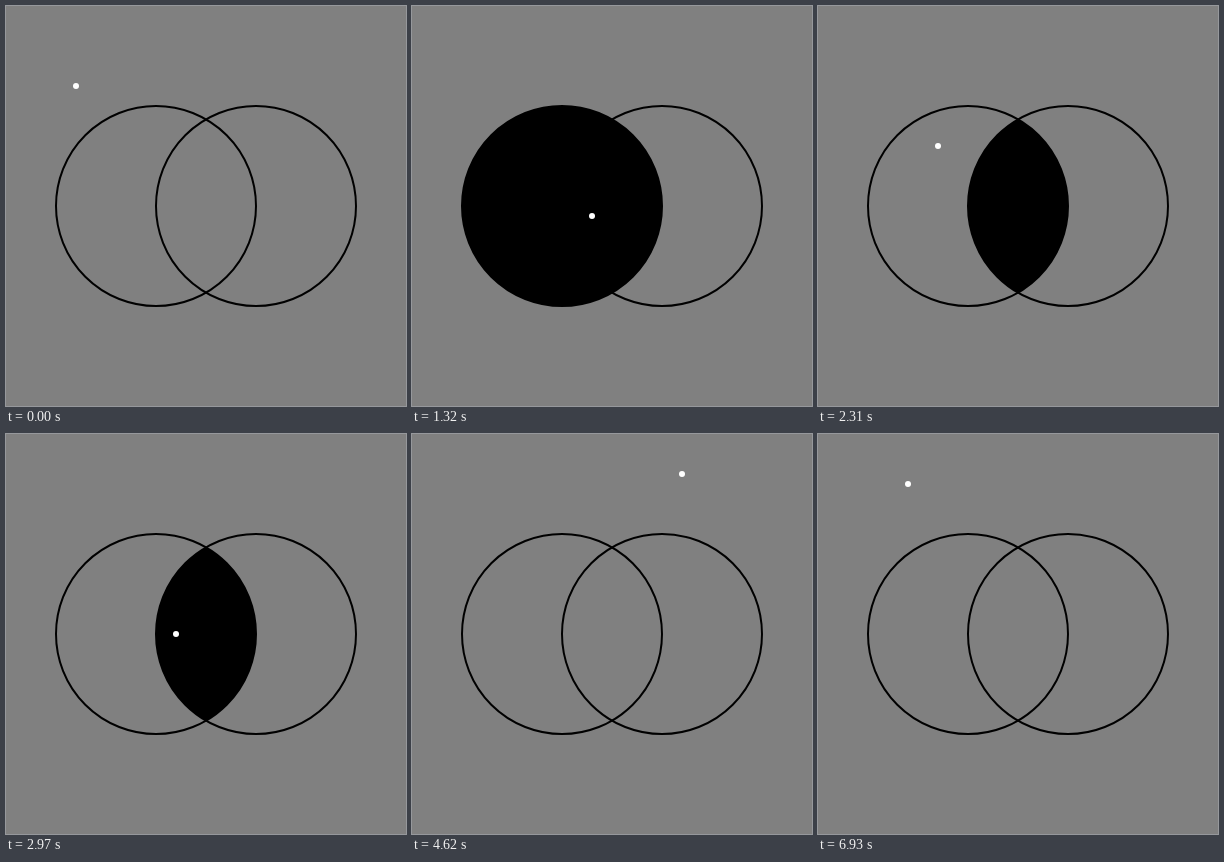
Recreate the animation shown at these times as an HTML page. Size 400 by 400 pixels, loop 7.59 s.

```html
<!DOCTYPE html>
<html lang="en">
<head>
<meta charset="utf-8">
<title>Two circles</title>
<style>
  html, body { margin: 0; width: 100%; height: 100%; overflow: hidden; background: #808080; }
  svg { display: block; width: 100%; height: 100%; }
</style>
</head>
<body>
<svg viewBox="0 0 400 400">
  <path id="crescent" d="M200 113.4A100 100 0 1 0 200 286.6A100 100 0 0 1 200 113.4Z"/>
  <path id="lens" d="M200 113.4A100 100 0 0 1 200 286.6A100 100 0 0 1 200 113.4Z"/>
  <g fill="none" stroke="#000" stroke-width="2">
    <circle cx="150" cy="200" r="100"/>
    <circle cx="250" cy="200" r="100"/>
  </g>
  <circle id="dot" r="3" fill="#fff"/>
</svg>
<script>
  const BEAT = 330, BEATS = 23, LIT_BEATS = 6;
  const [crescent, lens, dot] = ["crescent", "lens", "dot"].map(id => document.getElementById(id));

  const approach = [[70, 80], [100, 150]];
  // Swing line from inside the lens to inside the crescent
  const swing = [[180, 210], [170, 200], [110, 150], [120, 140]];
  const leave = [[220, 110], [260, 30], [270, 40], [230, 60], [80, 30]];

  function dotAt(beat) {
    if (beat < 3) return approach[Math.min(beat, 1)];
    if (beat < 12) return swing[Math.abs(3 - Math.abs(beat - 7))];
    if (beat < 18) return leave[Math.min(beat - 12, 4)];
    return [90, 40 + 5 * Math.ceil((beat - 18) / 2)];
  }

  // Each region is switched on by one visit and off by the next
  function light(region, beat, start) {
    const lit = beat >= start && beat < start + LIT_BEATS;
    region.setAttribute("visibility", lit ? "visible" : "hidden");
  }

  function draw(ms) {
    const beat = Math.floor(ms / BEAT) % BEATS;
    const [x, y] = dotAt(beat);
    dot.setAttribute("cx", x);
    dot.setAttribute("cy", y);
    light(crescent, beat, 1);
    light(lens, beat, 4);
  }

  function tick() {
    draw(performance.now());
    requestAnimationFrame(tick);
  }
  tick();
</script>
</body>
</html>
```
